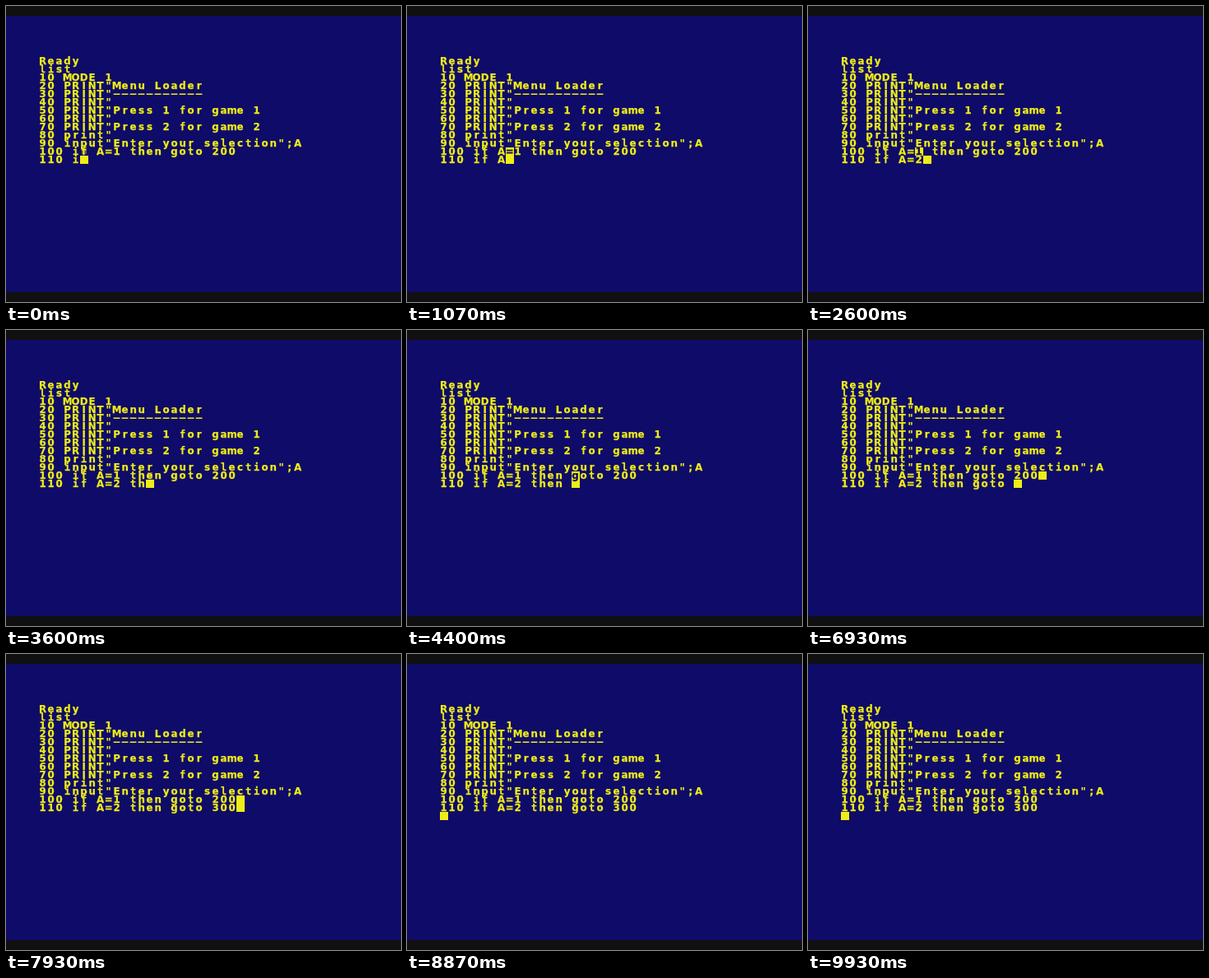
Animation, 480 px wide and 360 px high, one loop 9.99 s. Source, as an HTML page:

```html
<!DOCTYPE html>
<html lang="en">
<head>
<meta charset="utf-8">
<title>BASIC listing</title>
<style>
  html, body { margin: 0; width: 100%; height: 100%; overflow: hidden; background: #101010; }
  svg { display: block; width: 480px; height: 360px; }
  text {
    font: bold 11.8px "DejaVu Sans", sans-serif;
    text-anchor: middle;
    stroke: currentColor;
    stroke-width: 0.25px;
  }
  .slab { font-family: "DejaVu Sans Mono", monospace; }
  .ink { color: #efed18; fill: currentColor; }
  .paper { color: #0f0b68; fill: currentColor; }
</style>
</head>
<body>
<svg id="screen" viewBox="0 0 480 360">
  <rect class="paper" y="12" width="480" height="336"/>
</svg>
<script>
const LOOP = 9990, CELL = 10, LEFT = 40, TOP = 62;
const COPY_ROW = 11, EDIT_ROW = 12, FLASH = 70;
const listing = [
  'Ready',
  'list',
  '10 MODE 1',
  '20 PRINT"Menu Loader',
  '30 PRINT"' + '−'.repeat(11),
  '40 PRINT"',
  '50 PRINT"Press 1 for game 1',
  '60 PRINT"',
  '70 PRINT"Press 2 for game 2',
  '80 print"',
  '90 input"Enter your selection";A',
  '100 if A=1 then goto 200'
];

// [start, keys, gap]: c copies a character, > moves the copy cursor, < deletes
const keys = [
  [0, 'ccccc', 300],
  [2100, '2', 0],
  [2850, '>', 0],
  [3150, 'cccccc', 220],
  [4600, 'cccccccc', 220],
  [6500, '<<<', 200],
  [7200, '300', 230],
  [8600, '\n', 0]
];

const screen = document.getElementById('screen');

function make(tag, cls, attrs = {}) {
  const el = document.createElementNS('http://www.w3.org/2000/svg', tag);
  if (cls) el.setAttribute('class', cls);
  return set(el, attrs);
}
function set(el, attrs) {
  for (const name in attrs) el.setAttribute(name, attrs[name]);
  return el;
}
function add(tag, cls, attrs) {
  return screen.appendChild(make(tag, cls, attrs));
}
const colX = col => LEFT + col * CELL;
const rowY = row => TOP + row * CELL;

// Narrow letters take the monospaced face, which gives them slabs.
function print(el, str, col, row) {
  set(el, { y: rowY(row) + 8.75 });
  el.replaceChildren(...[...str].map((ch, i) => {
    const cell = make('tspan', /[iflt]/.test(ch) && 'slab', { x: colX(col + i) + 4.6 });
    cell.textContent = ch;
    return cell;
  }));
}
function block(el, col, row) {
  set(el, { x: colX(col), y: rowY(row), width: CELL, height: CELL });
}

function buildStates() {
  const states = [];
  let line = '110 ', copy = 4;
  for (const [start, run, gap] of keys) {
    [...run].forEach((key, i) => {
      const entered = key === '\n';
      if (key === 'c') line += listing[COPY_ROW][copy++];
      else if (key === '>') copy++;
      else if (key === '<') line = line.slice(0, -1);
      else if (!entered) line += key;
      states.push({ at: start + i * gap, line, copy, entered, copied: key === 'c' });
    });
  }
  return states;
}

const states = buildStates();
listing.forEach((str, row) => print(add('text', 'ink'), str, 0, row));
const editLine = add('text', 'ink');
const cursor = add('rect', 'ink');
const copyCursor = add('rect', 'ink');
const copyChar = add('text', 'paper');
const ghost = add('rect', 'ink', { width: 6, height: 7, opacity: 0.35 });

function show(state, flashing) {
  const { line, copy, entered } = state;
  print(editLine, line, 0, EDIT_ROW);
  block(cursor, entered ? 0 : line.length, entered ? EDIT_ROW + 1 : EDIT_ROW);
  block(copyCursor, copy, COPY_ROW);
  print(copyChar, listing[COPY_ROW][copy] || '', copy, COPY_ROW);
  set(ghost, { x: colX(copy) + 2, y: rowY(COPY_ROW) + 1 });
  const solid = !entered && !flashing;
  copyCursor.style.display = copyChar.style.display = solid ? '' : 'none';
  ghost.style.display = flashing ? '' : 'none';
}

let shown = '';
function tick() {
  const t = performance.now() % LOOP;
  const index = states.findLastIndex(s => s.at <= t);
  const state = states[index];
  const flashing = state.copied && t - state.at < FLASH;
  const id = index + '/' + flashing;
  if (id !== shown) {
    show(state, flashing);
    shown = id;
  }
  requestAnimationFrame(tick);
}
tick();
</script>
</body>
</html>
```
